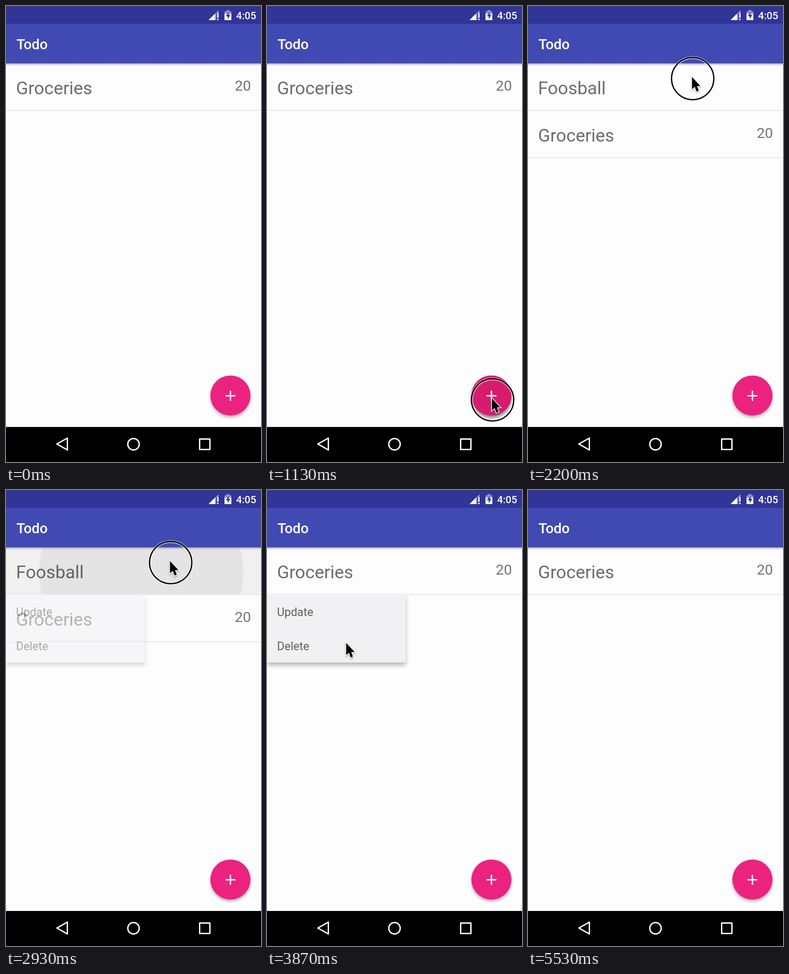
These frames come from a looping animation (559x1002 px, 5.59 s). An HTML page:

```html
<!DOCTYPE html>
<html lang="en">
<head>
<meta charset="utf-8">
<title>Todo</title>
<style>
html, body { margin: 0; width: 100%; height: 100%; overflow: hidden; background: #fefdfe; }
svg { display: block; width: 559px; height: 1002px; font-family: Roboto, sans-serif; }
.item { font-size: 39.2px; fill: #6d6d6e; }
.count { font-size: 31.5px; fill: #747475; text-anchor: end; }
.option { font-size: 25px; fill: #606062; }
.bar { font-weight: 500; fill: #fff; }
.line { fill: none; stroke: #fff; stroke-width: 3; stroke-linejoin: round; }
</style>
</head>
<body>
<svg viewBox="0 0 559 1002">
  <defs>
    <linearGradient id="fade" x2="0" y2="1">
      <stop stop-color="#77778c" stop-opacity=".75"/>
      <stop offset="1" stop-color="#aaaab8" stop-opacity="0"/>
    </linearGradient>
    <clipPath id="row"><path d="M0 126H559V229H0Z"/></clipPath>
    <filter id="low" x="-30%" y="-30%" width="160%" height="160%">
      <feDropShadow dx="0" dy="4" stdDeviation="3" flood-opacity=".3"/>
    </filter>
    <filter id="high" x="-30%" y="-30%" width="160%" height="160%">
      <feDropShadow dx="0" dy="6" stdDeviation="5" flood-opacity=".28"/>
    </filter>
    <filter id="tiny" x="-50%" y="-50%" width="200%" height="200%">
      <feDropShadow dx="0" dy="2" stdDeviation="1.5" flood-opacity=".35"/>
    </filter>
  </defs>

  <rect width="559" height="1002" fill="#fefdfe"/>

  <g id="added">
    <text class="item" x="22" y="194">Foosball</text>
    <path d="M0 229.5H559" stroke="#e6e6eb" stroke-width="2"/>
  </g>
  <g id="groceries">
    <text class="item" x="22" y="194">Groceries</text>
    <text class="count" x="537" y="185.5">20</text>
    <path d="M0 229.5H559" stroke="#e6e6eb" stroke-width="2"/>
  </g>
  <g id="touch" clip-path="url(#row)">
    <rect y="126" width="559" height="103" fill-opacity=".05"/>
    <circle id="ripple" cy="180" fill-opacity=".05"/>
  </g>

  <rect y="125" width="559" height="7" fill="url(#fade)"/>
  <rect width="559" height="40" fill="#303596"/>
  <rect y="39" width="559" height="87" fill="#414ab2"/>
  <text class="bar" x="23" y="95" font-size="31">Todo</text>
  <text class="bar" x="504.5" y="28.5" font-size="22.3">4:05</text>
  <path d="M444 31L466 9V16H461V31Z" fill="#9093c7"/>
  <path d="M444 31L458 17V31Z" fill="#fff"/>
  <path d="M463 16H466V26H463ZM463 28H466V31H463Z" fill="#fff"/>
  <path d="M479 12H483V9H490V12H494V18H479Z" fill="#9093c7"/>
  <path d="M479 17H494V31H479Z" fill="#fff"/>
  <path d="M488 13L482 22.500H486V29L492 19.500H488Z" fill="#303596"/>

  <g id="menu">
    <rect y="228" width="304" height="151" fill="#f1f1f3" filter="url(#high)"/>
    <text class="option" x="22" y="276.500">Update</text>
    <text class="option" x="22" y="351.500">Delete</text>
  </g>

  <circle cx="492" cy="856" r="44" fill="#ec2480" filter="url(#low)"/>
  <circle id="press" cx="492" cy="856" r="44" fill="#d71e70" filter="url(#high)"/>
  <path class="line" d="M481 856.500H503M492 845.500V867.500"/>

  <rect y="925" width="559" height="77"/>
  <path class="line" d="M111.500 962.500L134.500 949.500V975.500Z"/>
  <circle class="line" cx="279.500" cy="963" r="12.500"/>
  <path class="line" d="M424.500 951.500H447V974.500H424.500Z"/>

  <g id="pointer">
    <g id="ring" fill="none">
      <circle cx="1.500" cy="3.500" r="46" stroke="#fff" stroke-opacity=".6" stroke-width="6"/>
      <circle cx="1.500" cy="3.500" r="46.300" stroke="#000" stroke-width="2.800"/>
    </g>
    <path d="M0 0V27L6 21.500L10 32L15 30L11 20H18.500Z" stroke="#fff" stroke-width="3"
      paint-order="stroke" filter="url(#tiny)"/>
  </g>
</svg>
<script>
const LOOP = 5590;
const el = id => document.getElementById(id);
const [added, groceries, touch, ripple, menu, press, pointer, ring] =
  ['added', 'groceries', 'touch', 'ripple', 'menu', 'press', 'pointer', 'ring'].map(el);

// time, x, y of the pointer tip
const path = [
  [180, 550, 1010], [480, 493, 862], [1780, 493, 862], [2110, 359.5, 156],
  [3110, 359.5, 156], [3450, 173.5, 336], [4090, 173.5, 336],
  [4600, 268, 935], [5000, 262, 1012]
];
const holds = [[540, 1640], [2150, 3090], [3520, 3710]];

const within = (t, a, b) => t >= a && t < b;
const ramp = (t, a, b) => Math.min(1, Math.max(0, (t - a) / (b - a)));
const ease = p => p * p * (3 - 2 * p);
const show = (node, on) => node.setAttribute('visibility', on ? 'inherit' : 'hidden');
const alpha = (node, value) => node.setAttribute('opacity', value);

function pointerAt(t) {
  const i = Math.max(1, path.findIndex(k => k[0] > t));
  const [a, b] = [path[i - 1], path[i]];
  const p = ease(ramp(t, a[0], b[0]));
  return [1, 2].map(n => a[n] + (b[n] - a[n]) * p);
}

function draw(t) {
  const hasNew = within(t, 1400, 3800);
  show(added, hasNew);
  groceries.setAttribute('transform', `translate(0 ${hasNew ? 104 : 0})`);

  alpha(press, ramp(t, 680, 1000) * (1 - ramp(t, 1620, 1860)));

  const grow = ramp(t, 2330, 3094);
  ripple.setAttribute('cx', 361 - 82 * grow);
  ripple.setAttribute('r', 284 * grow);
  alpha(touch, ramp(t, 2280, 2500) * (1 - ramp(t, 3090, 3400)));

  show(menu, within(t, 2840, 3920));
  alpha(menu, ramp(t, 2840, 3010));

  const moving = within(t, path[0][0], path[path.length - 1][0]);
  show(pointer, moving);
  if (moving) pointer.setAttribute('transform', `translate(${pointerAt(t)})`);
  show(ring, moving && holds.some(h => within(t, ...h)));
}

const start = performance.now();
function frame() {
  draw((performance.now() - start) % LOOP);
  requestAnimationFrame(frame);
}
draw(0);
requestAnimationFrame(frame);
</script>
</body>
</html>
```
